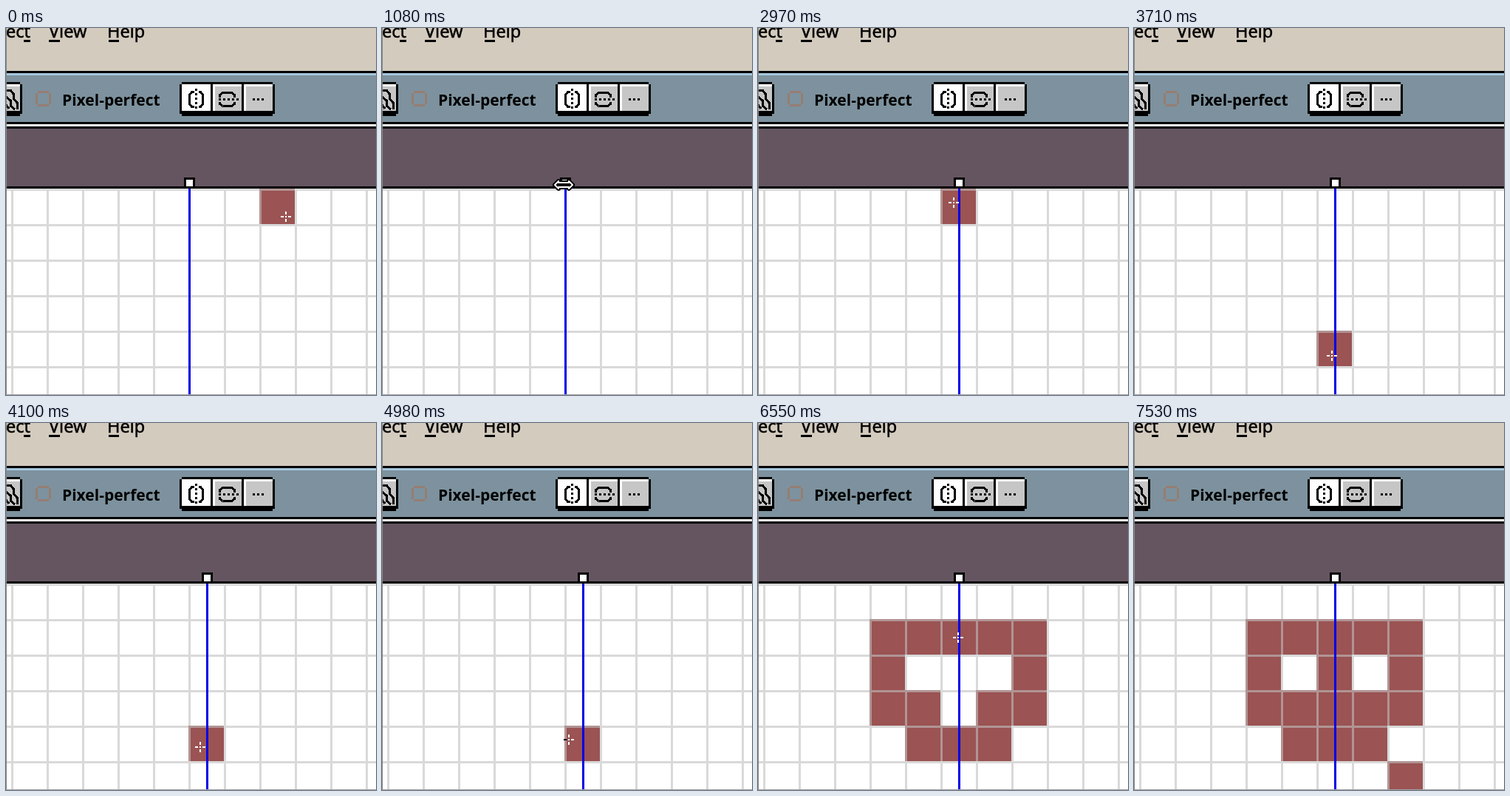
Animation of 501 by 496 pixels, one loop 8.29 s. Source, as an HTML page with a canvas:

```html
<!DOCTYPE html>
<html lang="en">
<head>
<meta charset="utf-8">
<title>Symmetry axis</title>
<style>
html, body { margin: 0; width: 100%; height: 100%; overflow: hidden; background: #fff; }
svg, canvas { position: absolute; left: 0; top: 0; width: 501px; height: 496px; display: block; }
text { font-family: "Noto Sans", "Open Sans", sans-serif; fill: #000; }
.menu { font-size: 23.5px; stroke: #000; stroke-width: .5px; }
.label { font-size: 21px; font-weight: 700; }
.line { fill: none; stroke: #000; stroke-width: 3; }
</style>
</head>
<body>
<svg viewBox="0 0 501 496" shape-rendering="crispEdges">
  <defs>
    <g id="mirror" class="line">
      <path d="M-3-10h-3l-3 4v12l3 4h3M3-10h3l3 4v12l-3 4h-3"/>
      <path d="M0-15v30" stroke-dasharray="3"/>
    </g>
    <g id="button">
      <rect width="39" height="36" fill="#fff"/>
      <rect x="3" y="3" width="36" height="33" fill="#c6c6c6"/>
    </g>
  </defs>

  <!-- menu bar -->
  <rect width="501" height="58" fill="#d3cbbe"/>
  <g class="menu">
    <text x="33" y="13" text-anchor="end">ect</text>
    <text x="58" y="13">View</text>
    <text x="137" y="13">Help</text>
  </g>
  <path class="line" d="M24 17h9M58 17h15M139 17h14"/>

  <!-- tool bar -->
  <rect y="58" width="501" height="3"/>
  <rect y="61" width="501" height="66" fill="#7d929e"/>
  <rect y="61" width="501" height="3" fill="#a5c6dc"/>
  <rect y="127" width="501" height="9"/>
  <rect y="130" width="501" height="3" fill="#fff"/>
  <rect y="136" width="501" height="78" fill="#655561"/>
  <rect y="214" width="501" height="3"/>

  <path d="M0 73h19v3h3v40h-3v3H0z"/>
  <use href="#button" x="-20" y="76"/>
  <path class="line" d="M0 84h6l4 5v6l5 6v9M0 93l6 5v7l6 5M0 104l4 5"/>

  <path d="M43 86.500h15M43 104.500h15M41.500 88v15M59.500 88v15" stroke="#967d73" stroke-width="3"/>
  <text class="label" x="76" y="105">Pixel-perfect</text>

  <path d="M238 73h123v3h3v40h-3v3H238v-3h-3V76h3z"/>
  <rect x="238" y="76" width="39" height="36" fill="#fff"/>
  <use href="#button" x="280" y="76"/>
  <use href="#button" x="322" y="76"/>
  <use href="#mirror" transform="translate(257.500 96.500)"/>
  <use href="#mirror" transform="translate(299.500 96.500) rotate(90)"/>
  <path class="line" d="M334 96.500h15" stroke-dasharray="3"/>
</svg>
<canvas id="view" width="501" height="496"></canvas>
<script>
const LOOP = 8290, STEP = 120, CELL = 48, LEFT = 7, TOP = 217;
const PEN_DOWN = 4980, PEN_UP = 7500, AXIS_MOVED = 2220;
const ctx = document.getElementById('view').getContext('2d');

// Pointer positions from start to end, along a curve bent towards `via`
function move(start, end, from, to, { via, resize } = {}) {
  const count = Math.round((end - start) / STEP);
  const mid = via || from.map((v, k) => (v + to[k]) / 2);
  return Array.from({ length: count + 1 }, (_, i) => {
    const u = count ? i / count : 1;
    const at = k => Math.round((1 - u) ** 2 * from[k] + 2 * u * (1 - u) * mid[k] + u * u * to[k]);
    return { t: Math.round(start + u * (end - start)), x: at(0), y: at(1), resize };
  });
}

const steps = [
  move(0, 840, [379, 255], [256, 218]),
  move(960, 1080, [249, 213], [246, 212], { resize: true }),
  move(2100, 2340, [251, 213], [264, 217], { resize: true }),
  move(2970, 3090, [265, 236], [265, 276]),
  move(3230, 3710, [266, 316], [268, 443]),
  move(4100, 4220, [263, 438], [258, 432]),
  move(4980, 5700, [253, 428], [172, 296], { via: [165, 395] }),
  move(5820, 6550, [178, 295], [271, 290]),
  move(6670, 7150, [271, 301], [271, 408]),
  move(7530, 7530, [380, 503], [380, 503])
].flat();

const col = x => Math.floor((x - LEFT) / CELL);
const row = y => Math.floor((y - TOP) / CELL);
const key = (c, r) => c + ',' + r;
const onGrid = (x, y) => (x - LEFT) % CELL < 3 || (y - TOP) % CELL < 3;

function box(color, x, y, w, h) {
  ctx.fillStyle = color;
  ctx.fillRect(x, y, w, h);
}

function paintedCells(time, now) {
  const cells = new Set();
  const mid = col(272);
  if (!now.resize) cells.add(key(col(now.x), row(now.y)));
  for (const s of steps) {
    if (s.t < PEN_DOWN || s.t > PEN_UP || s.t > time) continue;
    cells.add(key(col(s.x), row(s.y)));
    cells.add(key(2 * mid - col(s.x), row(s.y)));
  }
  return cells;
}

// White over dark areas, black over light ones
function drawCross(cx, cy, cells) {
  const dot = (x, y) => {
    const dark = y < TOP || cells.has(key(col(x), row(y))) && !onGrid(x, y);
    box(dark ? '#fff' : '#000', x, y, 2, 2);
  };
  for (const d of [-7, -5, -1, 3, 5]) {
    dot(cx + d, cy - 1);
    dot(cx - 1, cy + d);
  }
}

function drawResize(cx, cy) {
  ctx.save();
  ctx.translate(cx, cy);
  ctx.beginPath();
  for (const s of [-1, 1]) {
    ctx.lineTo(12 * s, 0);
    ctx.lineTo(7 * s, 5 * s);
    ctx.lineTo(7 * s, 3 * s);
    ctx.lineTo(-7 * s, 3 * s);
    ctx.lineTo(-7 * s, 5 * s);
  }
  ctx.closePath();
  ctx.lineJoin = 'round';
  ctx.lineWidth = 6;
  ctx.strokeStyle = '#000';
  ctx.stroke();
  ctx.fillStyle = '#000';
  ctx.fill();
  ctx.lineWidth = 2;
  ctx.strokeStyle = '#fff';
  ctx.stroke();
  ctx.restore();
}

function draw(time) {
  const now = steps.filter(s => s.t <= time).pop();
  const cells = paintedCells(time, now);
  const axis = time < AXIS_MOVED ? 247 : 271;

  ctx.clearRect(0, 0, 501, 496);
  box('#fff', 0, TOP, 501, 279);
  for (const cell of cells) {
    const [c, r] = cell.split(',').map(Number);
    box('#9b5353', LEFT + c * CELL, TOP + r * CELL, CELL, CELL);
  }
  const grid = 'rgba(192,192,192,.6)';
  for (let x = LEFT; x < 501; x += CELL) box(grid, x, TOP, 3, 279);
  for (let y = TOP; y < 496; y += CELL)
    for (let x = LEFT - CELL; x < 501; x += CELL) box(grid, x + 3, y, CELL - 3, 3);

  box('#0000e6', axis, TOP, 3, 279);
  box('#000', axis - 6, 202, 15, 15);
  box('#fff', axis - 3, 205, 9, 9);

  if (now.resize) drawResize(now.x, now.y);
  else drawCross(now.x, now.y, cells);

  box('#858585', 0, 0, 1, 496);
  box('#a0a0a0', 0, 495, 501, 1);
}

const begin = performance.now();
function tick() {
  draw((performance.now() - begin) % LOOP);
  requestAnimationFrame(tick);
}
tick();
</script>
</body>
</html>
```
